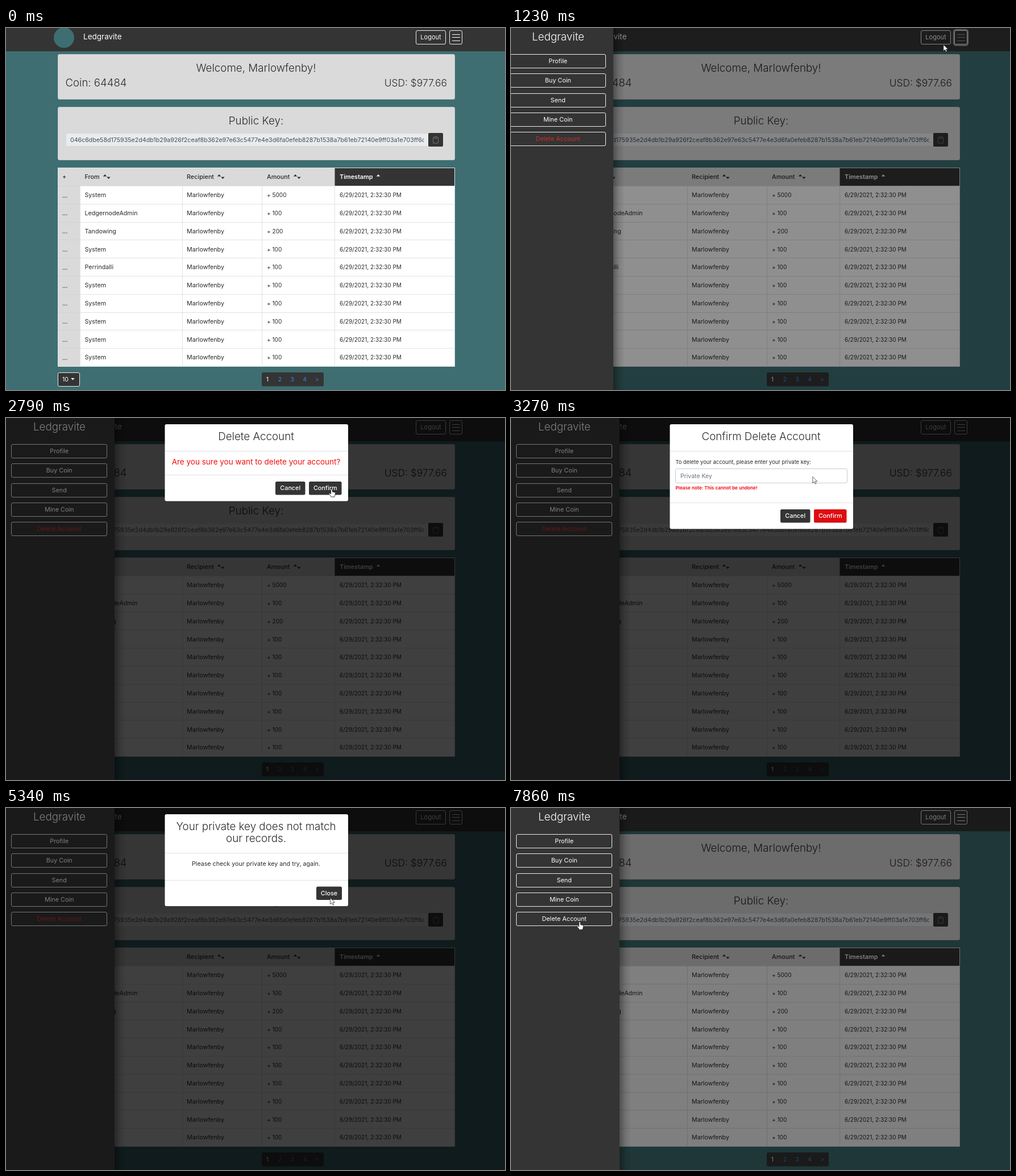
These frames come from a looping animation (878x638 px, 8000 ms). An HTML page:

```html
<!DOCTYPE html>
<html lang="en">
<head>
<meta charset="utf-8">
<title>Wallet dashboard</title>
<style>
html, body { margin: 0; width: 100%; height: 100%; overflow: hidden; background: #3e6e71; }
svg { display: block; }
text { font-family: Inter, "Noto Sans", sans-serif; white-space: pre; }
</style>
</head>
<body>
<svg id="stage" width="878" height="638" viewBox="0 0 878 638"></svg>
<script>
const LOOP = 8000;
const BRAND = 'Ledgravite', USER = 'Marlowfenby';
const DARK = '#343434', GREY = '#dadada', INK = '#292b2d', LINE = '#dee2e6', LIGHT = '#ececec';

// ---- markup helpers (boxes are given by their edges) ----
const rect = (x1, y1, x2, y2, fill, extra = '') =>
  `<rect x="${x1}" y="${y1}" width="${x2 - x1}" height="${y2 - y1}" fill="${fill}" ${extra}/>`;
const outlined = (x1, y1, x2, y2, stroke, fill = 'none') =>
  rect(x1 + .5, y1 + .5, x2 - .5, y2 - .5, fill, `stroke="${stroke}" rx="2.5"`);
const text = (str, x, y, size, fill = INK, extra = '') =>
  `<text x="${x}" y="${y}" font-size="${size}" fill="${fill}" ${extra}>${str}</text>`;
const centred = (str, x, y, size, fill, extra = '') =>
  text(str, x, y, size, fill, `text-anchor="middle" ${extra}`);
const heading = (str, x, y, fill = INK) => centred(str, x, y, 18.8, fill, 'font-weight="350"');
const caret = (x, y, dir, fill = INK) =>
  `<path d="M${x - 3.2} ${y}h6.4l-3.2 ${3.6 * dir}z" fill="${fill}"/>`;
const hline = (x1, x2, y, stroke = LINE) => `<path d="M${x1} ${y}H${x2}" stroke="${stroke}"/>`;
const button = (label, x1, y1, x2, fill = DARK) =>
  rect(x1, y1, x2, y1 + 23.5, fill, 'rx="2.5"') +
  centred(label, (x1 + x2) / 2, y1 + 15.4, 10.8, '#fff', 'font-weight="500"');

// ---- page ----
function navbar() {
  return rect(0, 0, 878, 41, DARK) +
    '<circle cx="102" cy="17" r="18" fill="#3e6e71"/>' +
    text(BRAND, 136, 20, 13.5, '#fff') +
    outlined(721, 4, 774, 29, LIGHT) + centred('Logout', 747.5, 20.3, 11, '#f8f9fa') +
    outlined(780, 4, 803, 29, LIGHT) +
    '<path id="bars" d="M785 11.5h14M785 16.5h14M785 22.5h14" stroke="#f8f9fa" stroke-width="1.1"/>' +
    '<rect id="ring" x="779" y="3" width="25" height="27.5" rx="4" fill="none" stroke="#fff" stroke-opacity=".5" stroke-width="2.4"/>';
}

function cards() {
  const key = '046c6dbe58d175935e2d4db1b29a926f2ceaf8b362e97e63c5477e4e3d6fa0efeb8287b1538a7b61eb72140e9ff03a1e703ff6cc';
  return outlined(91, 46, 790, 126, '#c8cccc', GREY) +
    heading(`Welcome, ${USER}!`, 440, 76.5) +
    text('Coin: 64484', 104.5, 103, 18.6, INK, 'font-weight="350"') +
    text('USD: $977.66', 776, 103, 17.4, INK, 'text-anchor="end" font-weight="350"') +
    outlined(91, 139, 790, 233, '#c8cccc', GREY) +
    heading('Public Key:', 440, 170) +
    outlined(105, 185, 744, 209, '#d3d8dc', '#e9ecef') +
    `<svg x="105" y="185" width="630.5" height="24">${text(key, 8, 16, 10.65, '#495057')}</svg>` +
    rect(743, 185, 769, 209, DARK, 'rx="2"') +
    '<path d="M754 193h-2.5v10h9v-10h-2.5M754 191.5h4v3h-4z" fill="none" stroke="#777" stroke-width=".9"/>';
}

function table() {
  const cols = [91.5, 130.5, 310.5, 450.5, 578.5, 789.5], top = 246.5;
  const [left, first] = cols, sorted = cols[4], right = cols[5];
  const rowY = i => Math.floor(278.5 + 31.8 * i) + .5;
  const head = rowY(0), bottom = rowY(10);
  const textX = [99, 138.5, 318, 459, 587];
  const senders = { 1: 'LedgernodeAdmin', 2: 'Tandowing', 4: 'Perrindalli' };
  const amounts = { 0: 5000, 2: 200 };
  let out = rect(left, top, right, bottom, '#fff') + rect(left, top, right, head, GREY) +
    rect(left, top, first, bottom, GREY) + rect(sorted, top, right, head, DARK);
  for (const x of cols) out += `<path d="M${x} ${x === left || x === right ? top : head}V${bottom}" stroke="${LINE}"/>`;
  out += hline(left, right, top) + hline(left, right, bottom);
  ['+', 'From', 'Recipient', 'Amount', 'Timestamp'].forEach((label, i) => {
    out += text(label, textX[i], 266, 10.8, i === 4 ? '#fff' : INK, `font-weight="${i === 4 ? 600 : 500}"`);
  });
  for (const x of [174, 375, 509]) out += caret(x, 261.5, -1) + caret(x + 6.4, 262.5, 1);
  out += caret(655, 261.5, -1, '#fff');
  for (let i = 0; i < 10; i++) {
    const y = rowY(i), base = 298.1 + 31.8 * i;
    out += hline(left, first, y, '#d0d3d5') + hline(first, right, y) +
      text('...', textX[0], base + .5, 9.2, INK, 'font-weight="700"') +
      text(senders[i] || 'System', textX[1], base, 10.7) +
      text(USER, textX[2], base, 10.7) +
      text(`+ ${amounts[i] || 100}`, textX[3], base, 10.1) +
      text('6/29/2021, 2:32:30 PM', textX[4], base, 10);
  }
  return out;
}

function pager() {
  let out = outlined(91, 607, 130, 632, LIGHT, DARK) + text('10', 99, 622.5, 10.7, '#fff') +
    caret(117.5, 617, 1, '#fff') + rect(450, 607, 559, 631.5, DARK, 'rx="2.5"');
  ['1', '2', '3', '4', '&gt;'].forEach((label, i) => {
    out += centred(label, 460 + i * 21.9, 622.5, 10.5, i ? '#2f86e8' : '#fff');
  });
  return out;
}

function sidebar() {
  let out = rect(191, 0, 211, 638, 'url(#fade)', 'id="shade"') + rect(0, 0, 191, 638, DARK) +
    heading(BRAND, 94, 22.3, '#fff');
  ['Profile', 'Buy Coin', 'Send', 'Mine Coin', 'Delete Account'].forEach((label, i) => {
    const y = 46 + i * 34.3, top = Math.round(y);
    out += outlined(9, top, 178, top + 25, LIGHT) +
      centred(label, 93.7, y + 15.9, 10.8, '#fff', i === 4 ? 'id="deleteLabel"' : '');
  });
  return out;
}

// ---- dialogs ----
const dialogBox = (bottom, ...dividers) =>
  rect(279.5, 11, 602, bottom, '#fff', 'rx="3"') +
  dividers.map(y => hline(280, 601.5, y + .5)).join('');

const dialogs = [
  { open: 1886, close: 2890, body:
    dialogBox(146.5, 58, 100) + heading('Delete Account', 440, 38.5) +
    centred('Are you sure you want to delete your account?', 440, 82, 13.5, '#f01010') +
    button('Cancel', 474, 112, 526.5) + button('Confirm', 533, 112, 590.5) },
  { open: 2890, close: 5010, body:
    dialogBox(195.5, 58, 149) + heading('Confirm Delete Account', 440, 38.5) +
    text('To delete your account, please enter your private key:', 289.5, 80.5, 9.4) +
    outlined(289, 89, 592, 115, '#c6ccd2', '#fff') +
    text('Private Key', 298, 106, 10.5, '#6c757d') +
    text('Please note: This cannot be undone!', 289.5, 126, 8.2, '#f00010', 'font-weight="600"') +
    button('Cancel', 474, 161, 526.5) + button('Confirm', 533, 161, 590.5, '#de0c12') },
  { open: 5010, close: 7040, body:
    dialogBox(173, 79, 127) + heading('Your private key does not match', 440, 38.5) +
    heading('our records.', 440, 60) +
    centred('Please check your private key and try, again.', 440, 102, 10.7, INK) +
    button('Close', 546, 138.5, 591) }
];

// ---- pointer: hot spot of each shape is at 0,0 ----
const pointers = {
  arrow: '<path d="M0 0v11l2.6-2.3 1.8 4 1.9-.9-1.8-3.8h3.5z" fill="#fff" stroke="#222" stroke-width=".7"/>',
  hand: '<path d="M-1.4 .8q1.3-1.5 2.6 0V5l4.4 1q1 .4 1 1.5l-.8 4-1 2.6h-5.6l-1.2-2.2-3-3.4q.4-1.6 2-.8l1.6 1z" fill="#fff" stroke="#111" stroke-width=".8"/>',
  beam: '<path d="M-2.5-5h2l.5.5.5-.5h2M0-4.5v9M-2.5 5h2l.5-.5.5.5h2" fill="none" stroke="#222" stroke-width=".9"/>'
};
const pointerShapes = [
  [0, 'arrow'], [800, 'hand'], [1000, 'arrow'], [1690, 'hand'], [1885, 'arrow'], [2480, 'hand'],
  [2960, 'arrow'], [3330, 'beam'], [4250, 'arrow'], [4450, 'hand'], [5100, 'arrow'],
  [5480, 'hand'], [7180, 'arrow'], [7690, 'hand']
];
// start, end, target x, target y, sideways bend
const moves = [
  [70, 830, 796.5, 20, 222], [1150, 1730, 126, 197, 0], [1980, 2580, 573, 125, 0],
  [2950, 3410, 519, 97.5, 0], [4150, 4580, 557, 166, 0], [4580, 4720, 560, 170, 0],
  [5100, 5550, 579, 149, 0], [5690, 5760, 573.5, 149, 0], [7100, 7720, 121, 200.5, 0]
];
const clicks = [960, 1800, 2650, 4920, 6950];

// ---- build ----
const stage = document.getElementById('stage');
stage.innerHTML =
  '<defs><linearGradient id="fade"><stop stop-opacity=".36"/><stop offset=".5" stop-opacity=".12"/>' +
  '<stop offset="1" stop-opacity="0"/></linearGradient></defs>' +
  rect(0, 0, 878, 638, '#3e6e71') + navbar() + cards() + table() + pager() +
  rect(0, 0, 878, 638, '#000', 'id="veil"') + `<g id="sidebar">${sidebar()}</g>` +
  dialogs.map((d, i) => rect(0, 0, 878, 638, '#000', `id="veil${i}"`) + `<g id="dialog${i}">${d.body}</g>`).join('') +
  '<g id="pointer"><circle id="click" r="8" fill="#d8cf10" fill-opacity=".8"/>' +
  Object.entries(pointers).map(([name, body]) => `<g id="${name}">${body}</g>`).join('') + '</g>';

const set = (id, name, value) => document.getElementById(id).setAttribute(name, value);
const show = (id, on) => set(id, 'visibility', on ? 'visible' : 'hidden');

// ---- motion ----
const progress = (t, start, length) => Math.min(1, Math.max(0, (t - start) / length));
const smooth = u => u * u * (3 - 2 * u);
const easeOut = u => 1 - (1 - u) ** 1.6;

function pointerAt(t) {
  let x = 680, y = 642;
  for (const [start, end, tx, ty, bend] of moves) {
    if (t < start) break;
    const u = smooth(progress(t, start, end - start));
    x += (tx - x) * u + 2 * u * (1 - u) * bend;
    y += (ty - y) * u;
  }
  return [x, y];
}

function render(t) {
  const slide = smooth(progress(t, 975, 300));
  set('sidebar', 'transform', `translate(${Math.round(191 * (slide - 1))} 0)`);
  show('shade', slide > 0);
  set('veil', 'opacity', .5 * progress(t, 967, 300));

  const focused = t >= 960 && t < 1885;
  show('ring', focused);
  set('bars', 'opacity', focused ? .5 : 1);

  const hover = progress(t, 1690, 100) - progress(t, 1912, 150) + progress(t, 7710, 130);
  set('deleteLabel', 'fill', `rgb(${208 + 47 * hover},${45 + 210 * hover},${45 + 210 * hover})`);

  dialogs.forEach(({ open, close }, i) => {
    const alpha = progress(t, open, 150) * (1 - progress(t, close, 150));
    const lift = 1 - easeOut(progress(t, open, 300)) + easeOut(progress(t, close, 300));
    set('veil' + i, 'opacity', .5 * alpha);
    set('dialog' + i, 'opacity', alpha);
    set('dialog' + i, 'transform', `translate(0 ${-35 * lift})`);
  });

  const [x, y] = pointerAt(t);
  set('pointer', 'transform', `translate(${x} ${y})`);
  const shape = pointerShapes.filter(([start]) => t >= start).pop()[1];
  for (const name in pointers) show(name, name === shape);
  show('click', clicks.some(start => t >= start && t < start + 125));
}

const begin = performance.now();
function tick() {
  render((performance.now() - begin) % LOOP);
  requestAnimationFrame(tick);
}
tick();
</script>
</body>
</html>
```
